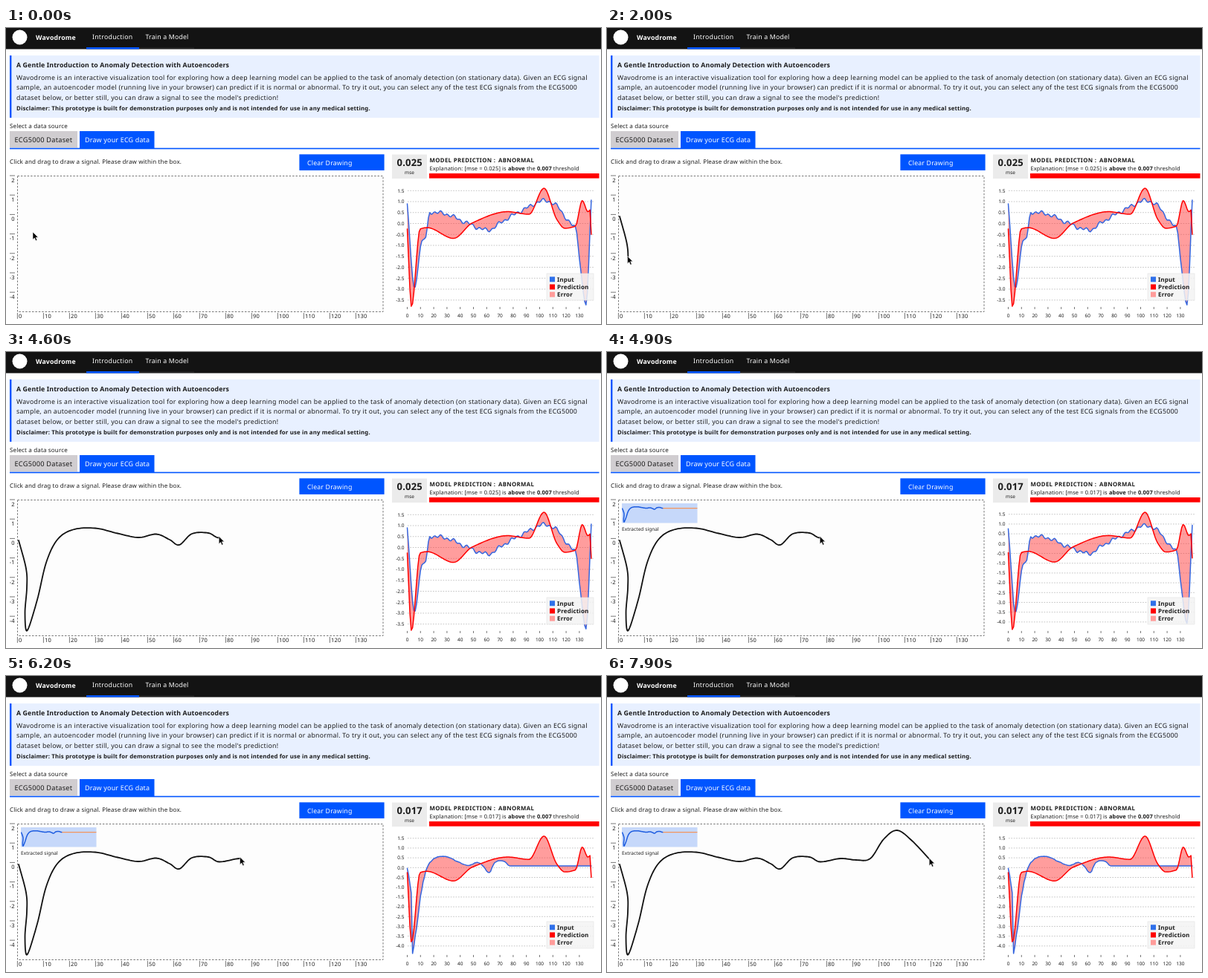
Write an HTML page that moves like this. It is 800x399 px and loops after 8 s.

```html
<!DOCTYPE html>
<html lang="en">
<head>
<meta charset="utf-8">
<title>Anomaly detection demo</title>
<style>
  html, body { margin: 0; width: 100%; height: 100%; overflow: hidden; background: #fff; }
  svg { display: block; width: 800px; height: 399px; }
  text {
    font: 8px "Noto Sans", "Open Sans", sans-serif;
    letter-spacing: .15px; fill: #1b1b1b; text-rendering: geometricPrecision;
  }
  .b { font-weight: 700; }
  .w { fill: #fff; }
  .body { font-size: 8.75px; letter-spacing: .25px; }
  .small { font-size: 7.5px; letter-spacing: .11px; }
  .axis { font-size: 6.5px; letter-spacing: 0; }
  .ruler { font-size: 7.5px; }
  .end { text-anchor: end; }
  .mid { text-anchor: middle; }
  .blue { fill: #0055ff; }
  .line { fill: none; stroke-width: 1.5; stroke-linejoin: round; stroke-linecap: round; }
  .tick { stroke: #555; stroke-width: .8; }
  .grid { stroke: #b4b4b4; stroke-width: .8; stroke-dasharray: 1.6 1.8; }
</style>
</head>
<body>
<svg viewBox="0 0 800 399">
  <!-- header -->
  <rect width="800" height="28.5" fill="#131313"/>
  <circle cx="18.5" cy="12.5" r="10" fill="#fff"/>
  <text class="b w" x="40" y="16" style="font-size:8.75px">Wavodrome</text>
  <text class="body w" x="116" y="15.3">Introduction</text>
  <text class="body w" x="187.5" y="15.3" style="letter-spacing:.18px">Train a Model</text>
  <rect x="179" y="26.6" width="74" height="1" fill="#303030"/>
  <rect class="blue" x="108" y="26" width="71" height="2.5"/>

  <!-- introduction -->
  <rect x="5" y="37" width="792.5" height="84" fill="#e8f0ff"/>
  <rect class="blue" x="5" y="37" width="2.4" height="84"/>
  <text class="b" x="14" y="52.8" style="font-size:8.75px;letter-spacing:.14px">A Gentle Introduction to Anomaly Detection with Autoencoders</text>
  <text class="body" x="14" y="69.6">Wavodrome is an interactive visualization tool for exploring how a deep learning model can be applied to the task of anomaly detection (on stationary data). Given an ECG signal</text>
  <text class="body" x="14" y="83.2">sample, an autoencoder model (running live in your browser) can predict if it is normal or abnormal. To try it out, you can select any of the test ECG signals from the ECG5000</text>
  <text class="body" x="14" y="96.8">dataset below, or better still, you can draw a signal to see the model's prediction!</text>
  <text class="b" x="14" y="110.6" style="font-size:7.8px">Disclaimer: This prototype is built for demonstration purposes only and is not intended for use in any medical setting.</text>

  <!-- tabs -->
  <text x="5" y="134.8">Select a data source</text>
  <rect x="5" y="139" width="91" height="22.5" fill="#d0cdd0"/>
  <text x="11.5" y="154" style="font-size:9.2px;letter-spacing:.25px">ECG5000 Dataset</text>
  <rect class="blue" x="99" y="139" width="100.5" height="23"/>
  <text class="w" x="106" y="154" style="font-size:9px">Draw your ECG data</text>
  <rect class="blue" x="5" y="161.7" width="792.5" height="1.6"/>

  <!-- drawing panel -->
  <text x="5" y="182.7">Click and drag to draw a signal. Please draw within the box.</text>
  <rect class="blue" x="394.4" y="170.3" width="114.2" height="21.6"/>
  <text class="body w" x="405" y="184.5" style="letter-spacing:.18px">Clear Drawing</text>
  <rect x="15.5" y="199.5" width="491.5" height="183" fill="#fdfdfd" stroke="#777" stroke-dasharray="2.5 1.9"/>
  <g id="ruler"></g>
  <g id="extract">
    <rect x="20" y="204" width="101.5" height="26.5" fill="#c6d8fa"/>
    <path class="line" d="M75 210.6H121" stroke="#f2955c" style="stroke-width:1.2"/>
    <path id="mini" class="line" stroke="#1c5ce0"/>
    <text class="axis" x="20" y="240.6" style="letter-spacing:.08px">Extracted signal</text>
  </g>
  <path id="stroke" class="line" stroke="#111" style="stroke-width:1.8"/>

  <!-- prediction panel -->
  <rect x="519" y="170.5" width="47" height="32.5" fill="#ebebeb"/>
  <text class="b mse" x="525.5" y="186.4" style="font-size:13px;letter-spacing:.2px"></text>
  <text class="axis mid" x="542.5" y="197.2">mse</text>
  <text class="b" y="181" style="font-size:7.8px;letter-spacing:.35px"><tspan x="569.5">MODEL PREDICTION :</tspan><tspan x="662">ABNORMAL</tspan></text>
  <text class="small" x="569.5" y="192.2">Explanation: [mse = <tspan class="mse"></tspan>] is <tspan class="b">above</tspan> the <tspan class="b">0.007</tspan> threshold</text>
  <rect x="569" y="196" width="228.5" height="6.6" fill="#f00"/>

  <!-- chart -->
  <g id="days"></g>
  <g id="oldAxis"></g>
  <g id="newAxis"></g>
  <path id="error" fill="#f33" fill-opacity=".48"/>
  <path id="input" class="line" stroke="#3566df"/>
  <path id="pred" class="line" stroke="#f00"/>
  <rect x="727" y="331" width="63" height="36" fill="#f4f4f4" fill-opacity=".85" stroke="#e2e2e2" stroke-width=".6"/>
  <g id="legend"></g>

  <path id="cursor" d="M0 0V10.2L2.4 8L4 11.8L5.8 11L4.2 7.3H7.3Z" fill="#000" stroke="#fff" stroke-width=".6"/>
</svg>
<script>
const LOOP = 8000, STEP = 100, SWITCH = 4700, MORPH = 800, SAMPLES = 140;
const $ = id => document.getElementById(id);
const lerp = (a, b, p) => a + (b - a) * p;
const clamp = p => Math.min(1, Math.max(0, p));
const progress = (t, from, to) => clamp((t - from) / (to - from));
const ease = p => p < .5 ? 4 * p ** 3 : 1 - 4 * (1 - p) ** 3;
const point = (x, y) => x.toFixed(2) + " " + y.toFixed(2);
const path = pts => "M" + pts.map(p => point(...p)).join("L");

function add(parent, tag, attrs, text) {
  const el = document.createElementNS("http://www.w3.org/2000/svg", tag);
  for (const k in attrs) el.setAttribute(k, attrs[k]);
  if (text !== undefined) el.textContent = text;
  parent.append(el);
}
const rule = (parent, cls, x1, y1, x2, y2) => add(parent, "line", { class: cls, x1, y1, x2, y2 });

// Axes and legend
for (let i = 0; i < 7; i++) {
  const y = 199 + 26.2 * i;
  rule($("ruler"), "tick", 5, y, 12, y);
  add($("ruler"), "text", { class: "ruler end", x: 11.8, y: y + 8.8 }, 2 - i);
}
const chartX = k => 539.5 + 1.78 * k;
for (let k = 0; k < SAMPLES; k += 10) {
  const x = 15.4 + 3.5 * k, cx = chartX(k);
  rule($("ruler"), "tick", x, 384, x, 392);
  add($("ruler"), "text", { class: "ruler", x: x + 1.7, y: 390.6 }, k);
  rule($("days"), "tick", cx, 376, cx, 379);
  add($("days"), "text", { class: "axis mid", x: cx, y: 390.4 }, k);
}
const OLD = { zero: 263.5, unit: 29.5, low: -3.5 };
const NEW = { zero: 258.3, unit: 26.4, low: -4 };
const toY = ({ zero, unit }, v) => zero - unit * v;
function drawAxis(group, scale) {
  for (let v = 1.5; v >= scale.low; v -= .5) {
    const y = toY(scale, v);
    rule(group, "grid", 540, y, 790, y);
    add(group, "text", { class: "axis end", x: 535.5, y: y + 2.3 }, v.toFixed(1));
  }
}
drawAxis($("oldAxis"), OLD);
drawAxis($("newAxis"), NEW);
[["Input", "#2f70ea"], ["Prediction", "#f00"], ["Error", "#ff9c9a"]].forEach(([name, fill], i) => {
  const y = 335.3 + 10.2 * i;
  add($("legend"), "rect", { x: 731, y, width: 7, height: 7, fill });
  add($("legend"), "text", { class: "b", x: 741, y: y + 6.5 }, name);
});

// Hand-drawn signal: a smooth curve through its turning points
const trail = [
  [17, 254], [27, 292], [28, 318], [25.5, 352], [28.5, 375.5], [42, 334], [54, 284], [69, 253],
  [90, 239.5], [120, 237.5], [150, 244.5], [178, 250], [202, 245.5], [220, 253], [233, 260],
  [250, 245], [272, 244], [287, 250.5], [314, 246], [335, 248], [354, 246], [372, 220],
  [390, 208], [410, 222], [434, 247.5]];
const END = trail.length - 1, PAUSE = 17;

function trailAt(u) {
  const i = Math.min(Math.floor(u), END - 1), s = u - i;
  const at = k => trail[Math.min(END, Math.max(0, k))];
  return [0, 1].map(c => {
    const a = at(i - 1)[c], b = at(i)[c], e = at(i + 1)[c], f = at(i + 2)[c];
    return b + s / 2 * (e - a + s * (2 * a - 5 * b + 4 * e - f + s * (3 * (b - e) + f - a)));
  });
}
function trailTo(u) {
  const pts = [];
  for (let s = 0; s < u; s += .1) pts.push(trailAt(s));
  return [...pts, trailAt(u)];
}
const accelerate = p => p ** 1.41;
const drawnAt = t => PAUSE * accelerate(progress(t, 1400, 4500))
  + (END - PAUSE) * accelerate(progress(t, 5600, 7900));

// Signal values at every step, by monotone cubic through key points
const steps = Array.from({ length: SAMPLES }, (_, k) => k);
function smooth(p) {
  const last = p.length - 1;
  const d = p.slice(1).map((q, i) => (q[1] - p[i][1]) / (q[0] - p[i][0]));
  const m = p.map((_, i) => {
    const a = d[Math.max(0, i - 1)], b = d[Math.min(last - 1, i)];
    return a * b <= 0 ? 0 : 2 * a * b / (a + b);
  });
  return steps.map(k => {
    let i = 0;
    while (i < last - 1 && k > p[i + 1][0]) i++;
    const h = p[i + 1][0] - p[i][0], s = (k - p[i][0]) / h, r = 1 - s;
    return r * r * ((1 + 2 * s) * p[i][1] + s * h * m[i])
      + s * s * ((1 + 2 * r) * p[i + 1][1] - r * h * m[i + 1]);
  });
}
const prediction = smooth([
  [0, -.25], [3.2, -3.81], [9.7, -.25], [15, -.19], [35, -.68], [49, .02], [76, .54], [92, .42],
  [103.3, 1.61], [113, .18], [119, -.22], [127, -.12], [132.2, 1.05], [136.5, .53], [138.2, .62], [139, -.5]]);
const jitter = k => k > 16 && k < 127 ? .06 * Math.sin(1.3 * k) + .05 * Math.sin(.57 * k) : 0;
const heartbeat = smooth([
  [0, .9], [5.5, -2.95], [11, -.8], [13.8, -.65], [17, .52], [28, .45], [44, .05], [61, -.3],
  [72, .1], [90, .7], [104, 1.05], [112, .85], [125, -.1], [127, -.15], [130.6, -1.9], [135, -3.72],
  [139, 1.07]]).map((v, k) => v + jitter(k));

// The drawing up to the pause, read as a signal and held at its last value
const firstPart = trailTo(PAUSE);
const extracted = steps.map(k => {
  const hit = firstPart.find(p => p[0] >= 15.4 + 3.5 * k) || firstPart[firstPart.length - 1];
  return .56 - .0362 * (hit[1] - 237.5);
});
$("mini").setAttribute("d", path(firstPart.map(([x, y]) => [20.7 + (x - 17) * .2, 208.7 + (y - 237.5) * .148])));

function render(t) {
  const updated = t >= SWITCH;
  $("extract").style.display = $("newAxis").style.display = updated ? "" : "none";
  $("oldAxis").style.display = updated ? "none" : "";
  document.querySelectorAll(".mse").forEach(el => { el.textContent = updated ? "0.017" : "0.025"; });

  const p = ease(progress(t, SWITCH, SWITCH + MORPH));
  const blend = (from, to) => steps.map(k => [chartX(k), lerp(toY(OLD, from[k]), toY(NEW, to[k]), p)]);
  const input = blend(heartbeat, extracted), pred = blend(prediction, prediction);
  $("input").setAttribute("d", path(input));
  $("pred").setAttribute("d", path(pred));
  $("error").setAttribute("d", path([...input, ...pred.reverse()]) + "Z");

  const u = drawnAt(t), [tipX, tipY] = trailAt(u);
  $("stroke").setAttribute("d", u > 0 ? path(trailTo(u)) : "");

  // The pointer rests right of the start, then moves over and leads the stroke
  const away = 1 - ease(progress(t, 100, 900));
  $("cursor").setAttribute("transform", `translate(${point(tipX - .8 + 19.8 * away, tipY - 2 + 23 * away)})`);
}

const start = performance.now();
function tick(now) {
  const t = Math.max(0, now - start) % LOOP;
  render(Math.floor(t / STEP) * STEP);
  requestAnimationFrame(tick);
}
render(0);
requestAnimationFrame(tick);
</script>
</body>
</html>
```
